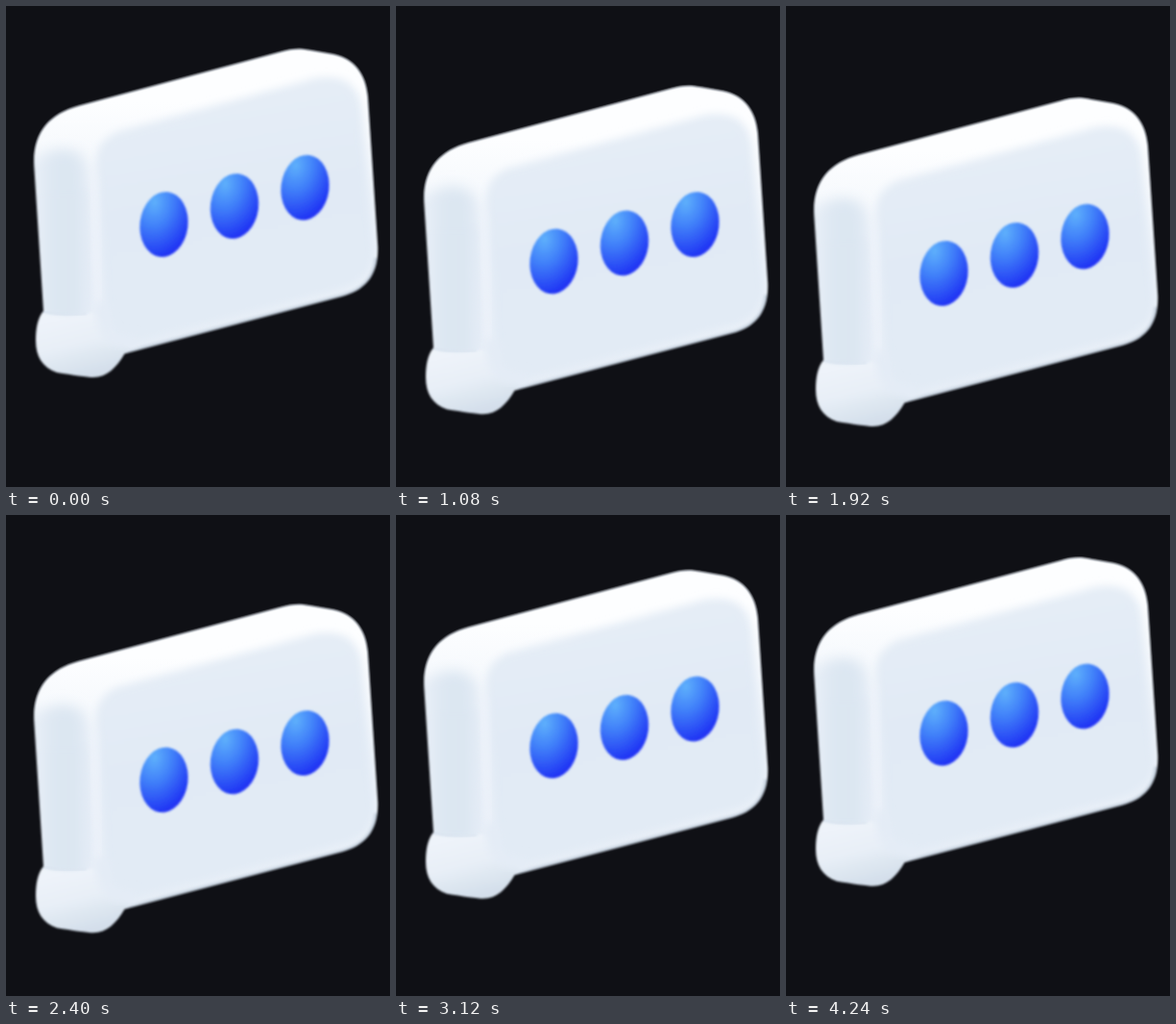
An HTML page for the animation above (4.28 s loop, 400 by 500 pixels).

```html
<!DOCTYPE html>
<html lang="en">
<head>
<meta charset="utf-8">
<title>Floating chat bubble</title>
<style>
  html, body { margin: 0; width: 100%; height: 100%; overflow: hidden; background: #0f1015; }
  svg { display: block; width: 100vw; height: 100vh; }
</style>
</head>
<body>
<svg viewBox="0 0 400 500">
  <defs>
    <path id="outline" d="M76 103.5 L286 47.5 C298 43.8 307 43.5 318 46 L341 50
      C363 54.5 375 71 377 94 L387.3 250 C388.5 281 373 296 350 302 L123.500 361.500
      C115 376 105 386 91 386 C84 386 69 383.5 53 381 C38 376 31 364 31 348
      C31 335 33 324 39 317 L29.3 167 C27 133 44 112 76 103.5 Z"/>
    <mask id="body" maskUnits="userSpaceOnUse" x="0" y="0" width="400" height="500">
      <use href="#outline" fill="#fff" filter="url(#edge)"/>
    </mask>
    <linearGradient id="base" gradientUnits="userSpaceOnUse" x1="0" y1="100" x2="0" y2="385">
      <stop offset="0" stop-color="#fdfeff"/>
      <stop offset=".35" stop-color="#f0f5fb"/>
      <stop offset="1" stop-color="#e6edf6"/>
    </linearGradient>
    <linearGradient id="side" gradientUnits="userSpaceOnUse" x1="31" y1="0" x2="98" y2="0">
      <stop offset="0" stop-color="#e8eff7"/>
      <stop offset=".25" stop-color="#dde7f2"/>
      <stop offset=".6" stop-color="#dbe6f1"/>
      <stop offset=".85" stop-color="#e6edf7"/>
      <stop offset="1" stop-color="#e9f0f8"/>
    </linearGradient>
    <linearGradient id="face" gradientUnits="userSpaceOnUse" x1="200" y1="100" x2="240" y2="325">
      <stop offset="0" stop-color="#e5edf6"/>
      <stop offset=".45" stop-color="#e1eaf5"/>
      <stop offset="1" stop-color="#e2ebf5"/>
    </linearGradient>
    <linearGradient id="tail" gradientUnits="userSpaceOnUse" x1="52" y1="318" x2="70" y2="388">
      <stop offset="0" stop-color="#eff4fa"/>
      <stop offset=".5" stop-color="#e8eff7"/>
      <stop offset="1" stop-color="#d3deea"/>
    </linearGradient>
    <radialGradient id="blue" cx=".25" cy=".18" r=".85">
      <stop offset="0" stop-color="#5eb0fc"/>
      <stop offset=".45" stop-color="#407ff9"/>
      <stop offset="1" stop-color="#2036f4"/>
    </radialGradient>
    <filter id="edge"><feGaussianBlur stdDeviation=".8"/></filter>
    <filter id="soft1" x="-20%" y="-20%" width="140%" height="140%"><feGaussianBlur stdDeviation="1.5"/></filter>
    <filter id="soft4" x="-20%" y="-20%" width="140%" height="140%"><feGaussianBlur stdDeviation="4"/></filter>
    <filter id="soft7" x="-30%" y="-30%" width="160%" height="160%"><feGaussianBlur stdDeviation="7"/></filter>
    <ellipse id="dot" rx="25" ry="34" fill="url(#blue)" transform="rotate(7)" filter="url(#edge)"/>
  </defs>
  <rect width="400" height="500" fill="#0f1015"/>
  <g id="bubble">
    <g mask="url(#body)">
      <use href="#outline" fill="url(#base)" stroke="#eef3f9" stroke-width="3"/>
      <path d="M10 165 L50 150 Q78 145 86 168 L94 322 L10 322 Z" fill="url(#side)" filter="url(#soft7)"/>
      <path d="M10 190 H83 L88 325 H10 Z" fill="url(#side)" filter="url(#soft4)"/>
      <path d="M94 168 Q92 139 118 130 L322 75 Q365 68 371 106 L384 252
        Q385 285 351 294 L126 353 Q107 354 103 328 Z" fill="url(#face)" filter="url(#soft4)"/>
      <path d="M90 175 L98 322" fill="none" stroke="#edf2fa" stroke-width="6" filter="url(#soft4)"/>
      <path d="M386 262 Q384 293 350 302 L123 361.500" fill="none" stroke="#c6d2df" stroke-width="5" filter="url(#soft1)"/>
      <path d="M30 317 Q56 325 84 320 Q98 316 102 330 L129 356 Q119 390 88 390 L25 385 Z"
        fill="url(#tail)" filter="url(#soft1)"/>
      <path d="M98 308 L104 334 Q109 351 136 349" fill="none" stroke="#e4ecf6" stroke-width="14" filter="url(#soft4)"/>
      <path d="M39 317.5 Q61 323 84 320" fill="none" stroke="#d9e3ef" stroke-width="1.5" filter="url(#edge)"/>
    </g>
    <use href="#dot" transform="translate(164.5 227)"/>
    <use href="#dot" transform="translate(238 208)"/>
    <use href="#dot" transform="translate(311.5 188.7)"/>
  </g>
</svg>
<script>
  const LOOP = 4280;
  const bubble = document.getElementById('bubble');
  // [time in ms, downward offset in px]
  const keys = [
    [0, 0], [240, 2.2], [560, 12.5], [720, 21.5], [1120, 39.5], [1480, 46.3], [1720, 49.3],
    [2000, 51.3], [2240, 52], [2400, 48.3], [2800, 26.3], [3120, 12.8], [3360, 6.7],
    [3720, 1.5], [3960, 0.3], [4280, -0.3]
  ];
  const slope = i => (keys[i + 1][1] - keys[i][1]) / (keys[i + 1][0] - keys[i][0]);

  // Harmonic mean of neighbouring slopes keeps the curve free of overshoot.
  const tangents = keys.map((_, i) => {
    if (i === 0 || i === keys.length - 1) return 0;
    const a = slope(i - 1), b = slope(i);
    return a * b > 0 ? 2 * a * b / (a + b) : 0;
  });

  function offsetAt(time) {
    let i = 0;
    while (i < keys.length - 2 && time >= keys[i + 1][0]) i++;
    const [t0, y0] = keys[i], [t1, y1] = keys[i + 1];
    const span = t1 - t0, u = (time - t0) / span, v = 1 - u;
    return y0 * v * v * (1 + 2 * u) + y1 * u * u * (3 - 2 * u)
      + span * u * v * (tangents[i] * v - tangents[i + 1] * u);
  }

  function render(time) {
    bubble.setAttribute('transform', `translate(0 ${offsetAt(time).toFixed(2)})`);
  }

  const start = performance.now();
  function tick() {
    render((performance.now() - start) % LOOP);
    requestAnimationFrame(tick);
  }
  render(0);
  requestAnimationFrame(tick);
</script>
</body>
</html>
```
